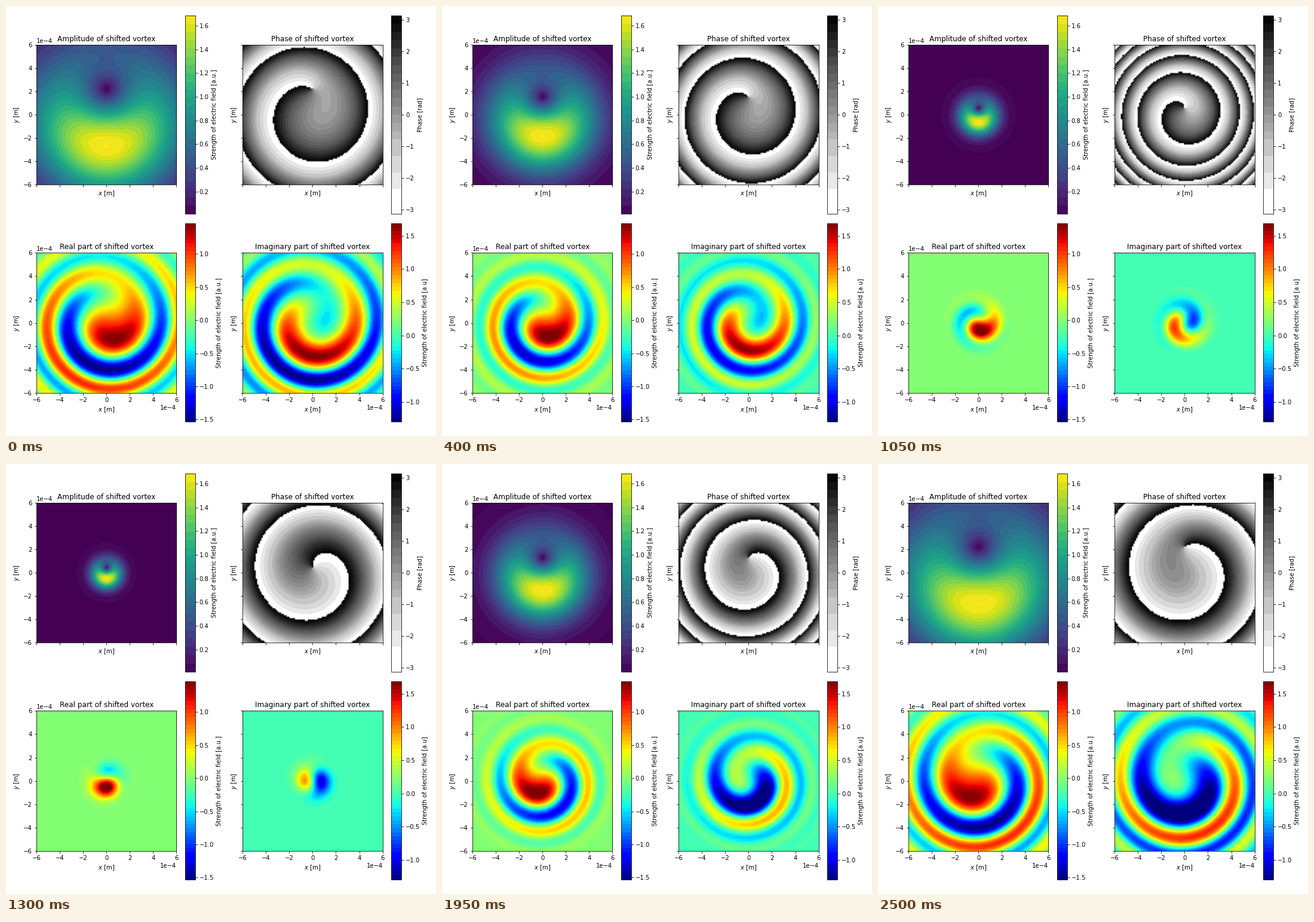
Animation, 720 px wide and 720 px high, one loop 2.55 s. Source, as a matplotlib script:

```python
import numpy as np
import matplotlib.pyplot as plt
from matplotlib.animation import FuncAnimation
from matplotlib.cm import ScalarMappable
from matplotlib.colors import ListedColormap, Normalize

SIZE, DPI = 720, 72
FRAMES, INTERVAL = 51, 50
HALF = 6e-4      # half width of the viewed plane in m
WAIST = 1e-4     # beam waist in m
Z_MAX = 5        # propagation range in Rayleigh lengths
SHIFT = 0.428    # vortex offset relative to the beam radius
BOX = 234.4      # side of a plot in px
NODES = 101

plt.rcParams.update({"font.family": "DejaVu Sans", "font.size": 10})

axis = np.linspace(-HALF, HALF, NODES)
X, Y = np.meshgrid(axis, axis)
EDGE = HALF * NODES / (NODES - 1)   # outer edge of the cells around the nodes


def field(zeta):
    """Gaussian beam carrying an off-axis vortex, zeta = z / Rayleigh length."""
    w = WAIST * np.sqrt(1 + zeta**2)
    vortex = 1 - (Y + 1j * X) / (SHIFT * w)
    return vortex * np.exp(-(1 + 1j * zeta) * (X**2 + Y**2) / w**2)


def banded(name, pos):
    """Stepped colour map that ends in the pure end colours of its base."""
    base = plt.get_cmap(name)
    return ListedColormap(base(pos)).with_extremes(under=base(0.0),
                                                   over=base(1.0))


def centres(n):
    return (np.arange(n) + 0.5) / n


def grey_steps():
    pos = centres(24)
    pos[:3] = 0
    pos[3:9] = np.repeat(pos[3:9].reshape(3, 2).mean(axis=1), 2)
    return pos


def place(left, top, width, height):
    """Axes from pixel coordinates measured from the top left corner."""
    return fig.add_axes([left / SIZE, 1 - (top + height) / SIZE,
                         width / SIZE, height / SIZE])


def panel(row, col, title, cmap, limits, ticks, label):
    left, top = 51 + 345.2 * col, 65.05 + 348.35 * row
    ax = place(left, top, BOX, BOX)
    norm = Normalize(*limits)
    image = ax.imshow(np.zeros((NODES, NODES)), cmap=cmap, norm=norm,
                      origin="lower", extent=(-EDGE, EDGE, -EDGE, EDGE),
                      interpolation="bilinear", interpolation_stage="data",
                      aspect="auto")
    marks = np.linspace(-HALF, HALF, 7)
    ax.set(xticks=marks, yticks=marks, xlim=(-HALF, HALF), ylim=(-HALF, HALF))
    ax.ticklabel_format(style="sci", scilimits=(-3, 3))
    ax.tick_params(labelbottom=row == 1, labelleft=col == 0)
    ax.xaxis.offsetText.set_visible(row == 1)
    ax.yaxis.offsetText.set_visible(col == 0)
    ax.set_xlabel("$x$ [m]")
    ax.set_ylabel("$y$ [m]")
    ax.set_title(title)

    cax = place(left + 249.2, top - 49.25, 16.6, 332.2)
    bar = fig.colorbar(ScalarMappable(norm, cmap), cax=cax, ticks=ticks)
    bar.set_label(label)
    return image


fig = plt.figure(figsize=(SIZE / DPI, SIZE / DPI), dpi=DPI, facecolor="white")

strength = "Strength of electric field [a.u.]"
jet = banded("jet", centres(50))
images = [
    panel(0, 0, "Amplitude of shifted vortex", banded("viridis", centres(24)),
          (0.011, 1.688), np.arange(1, 9) * 0.2, strength),
    panel(0, 1, "Phase of shifted vortex", banded("Greys", grey_steps()),
          (-np.pi, np.pi), np.arange(-3, 4), "Phase [rad]"),
    panel(1, 0, "Real part of shifted vortex", jet,
          (-1.535, 1.459), np.arange(-3, 3) * 0.5, strength),
    panel(1, 1, "Imaginary part of shifted vortex", jet,
          (-1.30, 1.685), np.arange(-2, 4) * 0.5, strength[:-2] + "]"),
]


def update(i):
    e = field(Z_MAX * (2 * i / (FRAMES - 1) - 1))
    for image, data in zip(images, (np.abs(e), np.angle(e), e.real, e.imag)):
        image.set_data(data)
    return images


anim = FuncAnimation(fig, update, frames=FRAMES, interval=INTERVAL,
                     repeat=True, repeat_delay=0, blit=False)
plt.show()
```
